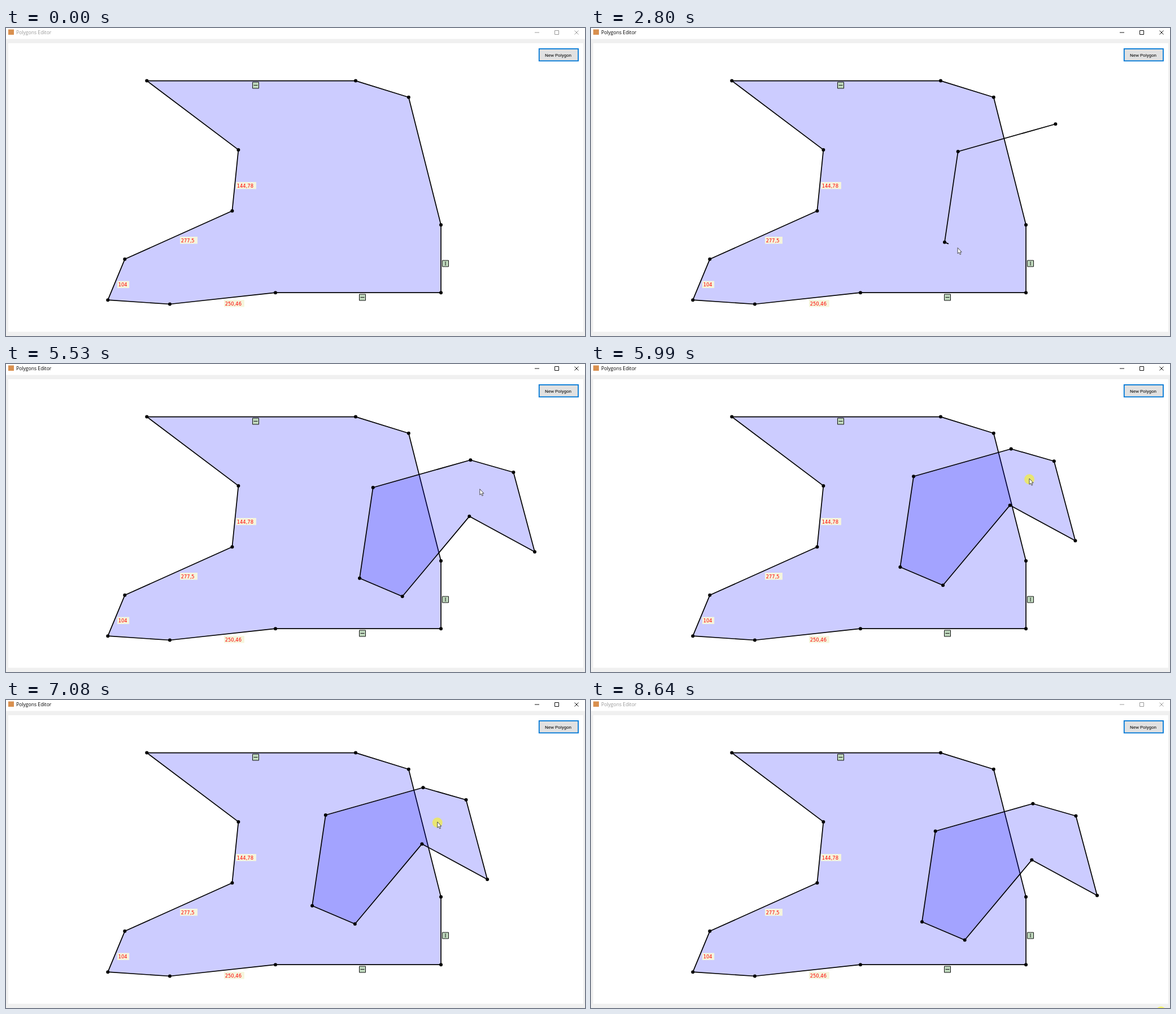
Write an HTML page that moves like this. It is 1025x546 px and loops after 8.72 s.

```html
<!DOCTYPE html>
<html lang="en">
<head>
<meta charset="utf-8">
<title>Polygons Editor</title>
<style>
  html, body { margin: 0; width: 100%; height: 100%; overflow: hidden; background: #f0f0f0; }
  svg { display: block; width: 1025px; height: 546px; }
  text { font-family: "Open Sans", "Noto Sans", sans-serif; }
  .edge { stroke: #000; stroke-width: 1.7; stroke-linejoin: round; stroke-linecap: round; }
  .fill { fill: rgba(0, 0, 255, .2); }
  .tag rect { fill: #f5f5dc; }
  .tag text { font: 8.4px "DejaVu Sans", sans-serif; fill: #f00; }
  .rule { fill: #bfd8bd; stroke: #111; stroke-width: 1; }
  #caption { font: 8.1px Roboto, sans-serif; text-anchor: middle; }
</style>
</head>
<body>
<svg viewBox="0 0 1025 546" xmlns="http://www.w3.org/2000/svg">
  <rect width="1025" height="546" fill="#f0f0f0"/>
  <rect width="1025" height="19.5" fill="#fff"/>
  <rect x="4" y="27" width="1018" height="511.5" fill="#fff"/>
  <rect x="4" y="2.5" width="10" height="9.5" fill="#d9904f"/>
  <text id="title" x="18" y="11" font-size="8.6">Polygons Editor</text>
  <path id="controls" fill="none" d="M936 8h8M971.5 4.5h7v7h-7zM1006.5 4.5l7 7m0-7l-7 7"/>
  <rect id="button" x="943.800" y="36.900" width="69.200" height="21.400"/>
  <text id="caption" x="977.500" y="51">New Polygon</text>
  <g id="base"></g>
  <g id="shape"></g>
  <circle id="press" r="9" fill="rgba(255,250,0,.55)"/>
  <path id="arrow" d="M0 0V10.300L2.300 8.200 4 12 5.700 11.300 4.100 7.600H7.100Z"
        fill="#fff" stroke="#222" stroke-width=".8" stroke-linejoin="round"/>
</svg>
<script>
const LOOP = 8720, STEP = 77.85;
const $ = id => document.getElementById(id);
const set = (el, attrs) => { for (const k in attrs) el.setAttribute(k, attrs[k]); };
const show = (el, on) => set(el, { visibility: on ? "visible" : "hidden" });

function add(parent, tag, attrs, text) {
  const el = document.createElementNS("http://www.w3.org/2000/svg", tag);
  set(el, attrs);
  if (text) el.textContent = text;
  parent.appendChild(el);
  return el;
}

const dot = (parent, [x, y]) => add(parent, "circle", { cx: x, cy: y, r: 3 });

// fixed polygon with its constraints
const base = $("base");
const outline = [[249.3, 93.6], [619, 93.6], [712.8, 122.8], [770, 349], [770, 469.2], [477, 469.2],
  [290, 489.5], [180.3, 482.2], [210.3, 409.8], [400.4, 324.2], [411.4, 215.9]];
add(base, "polygon", { class: "edge fill", points: outline.join(" ") });
outline.forEach(p => dot(base, p));

function tag(label, x, y) {
  const g = add(base, "g", { class: "tag" });
  add(g, "rect", { x, y, width: 6.5 + label.length * 4.9, height: 12.5 });
  add(g, "text", { x: x + 1.7, y: y + 9.6 }, label);
}
tag("144,78", 407, 273);
tag("277,5", 308, 370);
tag("104", 197, 448.5);
tag("250,46", 386, 482);

function rule(x, y, bar) {
  add(base, "path", { class: "rule", d: `M${x - 5.5} ${y - 5.5}h11v11h-11z${bar}` });
}
rule(442, 101.5, "m2 5.5h7");
rule(631, 477.5, "m2 5.5h7");
rule(778, 417.5, "m5.5 2v7");

// polygon drawn by the pointer
const points = [[822.3, 170.2], [649.7, 219], [626, 379.7], [701.7, 412], [820.3, 270.1], [936, 333], [898.4, 192]];
const shape = $("shape");
const body = add(shape, "path", { class: "edge" });
const dots = points.map(p => dot(shape, p));

// stops of the pointer: click, rest, travel on
const CLICK = 90, TRAVEL = 430;
const hold = [840, 225.5], away = [1009, 551];
const stops = [[985, 511], [975, 48], ...points, [825, 178], hold];
const times = [-20, 850, 1480, 2030, 2560, 3060, 3740, 4078, 4700, 5080, 5600];
const ACTIVE = times[1], CLOSE = times[9], GRAB = times[10];
const clicks = times.slice(1, 10);

// drag path, evenly timed
const BEAT = 156;
const drag = [hold, [745, 229], [761, 206], [789, 202], [797, 193], [768, 221], [739, 218],
  [698, 213], [715, 197], [756, 210.5], [770, 222], [800, 239]];
const DRAGGED = GRAB + BEAT * (drag.length - 1);
const DROP = 7470, GONE = 8330, LEAVE = 8610;

const ease = u => { u = Math.min(1, Math.max(0, u)); return u * u * (3 - 2 * u); };
const mix = (a, b, u) => a.map((v, i) => v + (b[i] - v) * u);

function spline(list, s) {
  const i = Math.floor(s), u = s - i;
  const at = k => list[Math.max(0, Math.min(list.length - 1, k))];
  const [a, b, c, d] = [at(i - 1), at(i), at(i + 1), at(i + 2)];
  return b.map((v, k) => v + u / 2 * (c[k] - a[k] +
    u * (2 * a[k] - 5 * v + 4 * c[k] - d[k] + u * (3 * (v - c[k]) + d[k] - a[k]))));
}

function pointer(t) {
  if (t >= DRAGGED) return mix(drag[drag.length - 1], away, ease((t - DROP) / (GONE - DROP)));
  if (t >= GRAB) return spline(drag, (t - GRAB) / BEAT);
  const i = Math.max(1, times.findIndex(v => v > t));
  const leave = times[i - 1] + CLICK;
  const span = Math.min(TRAVEL, times[i] - leave);
  return mix(stops[i - 1], stops[i], ease((t - leave) / span));
}

function drawShape(t) {
  const count = points.filter((p, i) => t >= times[i + 2]).length;
  const closed = t >= CLOSE;
  const line = points.slice(0, count);
  if (count && !closed) line.push(pointer(t - STEP));
  set(body, {
    d: count ? "M" + line.join("L") + (closed ? "Z" : "") : "",
    fill: closed ? "rgba(0,0,255,.2)" : "none"
  });
  dots.forEach((d, i) => show(d, i < count));
  // the dragged polygon trails the pointer by one refresh
  const [x, y] = t > GRAB + STEP ? pointer(Math.min(t - STEP, DROP)) : hold;
  set(shape, { transform: `translate(${x - hold[0]} ${y - hold[1]})` });
}

function drawWindow(t, [x, y], pressed) {
  const active = t >= ACTIVE && t < LEAVE;
  set($("title"), { fill: active ? "#000" : "#999" });
  set($("controls"), { stroke: active ? "#111" : "#999" });
  const over = x > 943 && x < 1013 && y > 36 && y < 59;
  const down = over && pressed;
  set($("button"), {
    fill: down ? "#cce4f7" : over ? "#e5f1fb" : "#e1e1e1",
    stroke: down ? "#005499" : "#0078d7",
    "stroke-width": over ? 1.1 : 1.8
  });
}

function render(ms) {
  // the screen refreshes in even steps
  const t = Math.floor((ms + 8) / STEP) * STEP - 2;
  const pos = pointer(t);
  const pressed = clicks.some(c => t >= c && t < c + CLICK) || (t >= GRAB && t < DROP) || t >= LEAVE;
  drawShape(t);
  drawWindow(t, pos, pressed);
  set($("press"), { cx: pos[0], cy: pos[1] + 1.2 });
  show($("press"), pressed);
  set($("arrow"), { transform: `translate(${pos})` });
  show($("arrow"), t > 0 && t < GONE);
}

const start = performance.now();
function tick() {
  render((performance.now() - start) % LOOP);
  requestAnimationFrame(tick);
}
tick();
</script>
</body>
</html>
```
